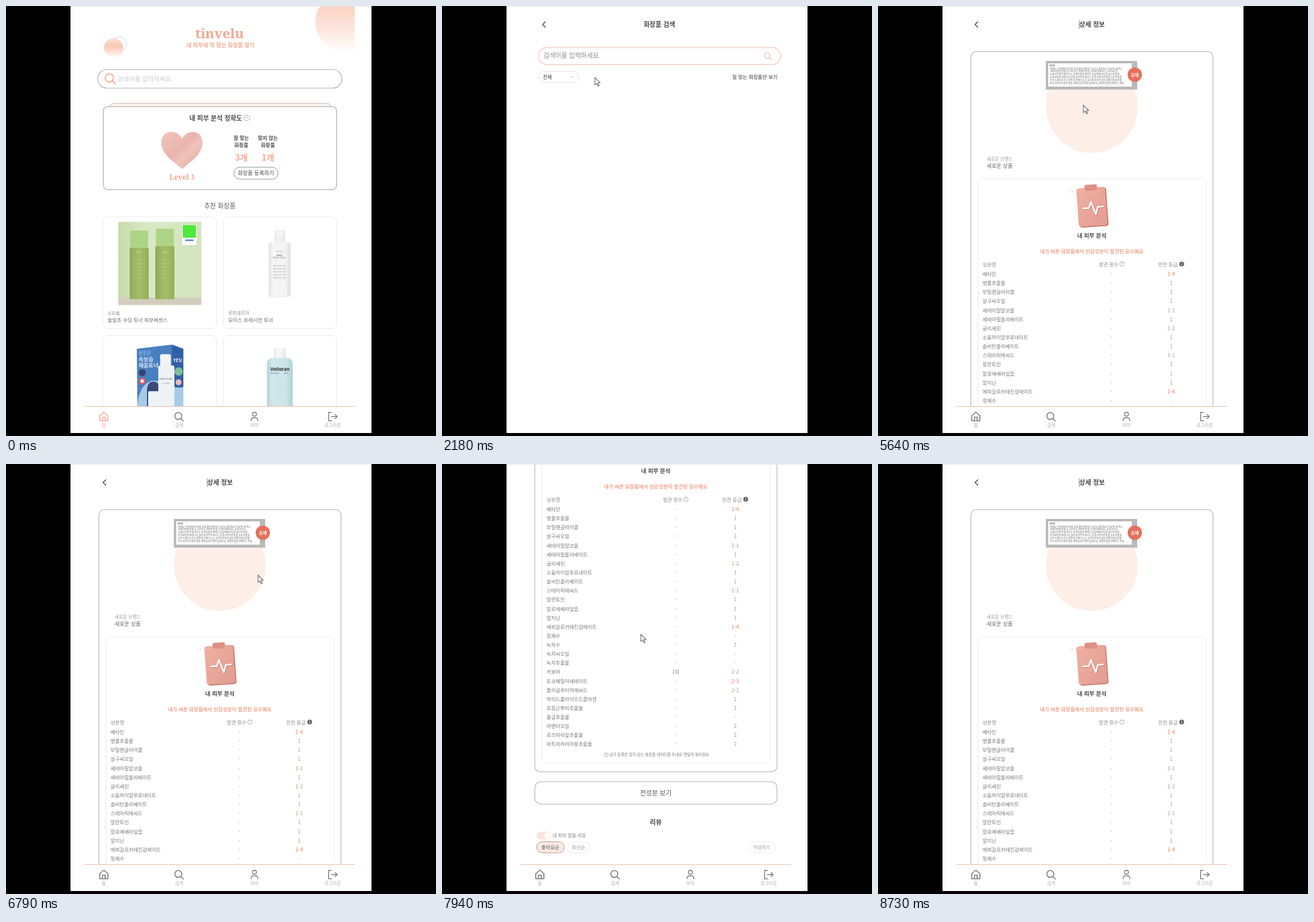
These frames come from a looping animation (720x720 px, 9.06 s). An HTML page:

```html
<!DOCTYPE html>
<html lang="ko">
<head>
<meta charset="utf-8">
<title>화장품 검색</title>
<style>
  html, body { margin: 0; width: 100%; height: 100%; overflow: hidden; background: #000; }
  svg { display: block; width: 720px; height: 720px; font-family: "Noto Sans CJK KR", "Noto Sans CJK JP", "Noto Sans CJK", sans-serif; }
  .serif { font-family: "Noto Serif", serif; font-weight: 900; }
</style>
</head>
<body>
<svg id="stage" viewBox="0 0 720 720" xmlns="http://www.w3.org/2000/svg"></svg>
<script>
const LOOP = 9060;
const SALMON = '#f3a891', DARK = '#4a4a4a', GRAY = '#777', LIGHT = '#ebebeb';

// Text is placed by its vertical centre.
const text = (x, cy, str, size, fill = DARK, attrs = '') =>
  `<text x="${x}" y="${(cy + size * 0.37).toFixed(2)}" font-size="${size}" fill="${fill}" ${attrs}>${str}</text>`;
const MID = 'text-anchor="middle"';
const BOLD = 'font-weight="700"';
const MEDIUM = 'font-weight="500"';
const MIDBOLD = MID + ' ' + BOLD;
const rect = (x, y, w, h, r, fill, stroke = 'none', sw = 1) =>
  `<rect x="${x}" y="${y}" width="${w}" height="${h}" rx="${r}" fill="${fill}" stroke="${stroke}" stroke-width="${sw}"/>`;
const circle = (x, y, r, fill, stroke = 'none', sw = 1) =>
  `<circle cx="${x}" cy="${y}" r="${r}" fill="${fill}" stroke="${stroke}" stroke-width="${sw}"/>`;
const line = (d, stroke, sw = 1, attrs = '') =>
  `<path d="${d}" fill="none" stroke="${stroke}" stroke-width="${sw}" stroke-linecap="round" stroke-linejoin="round" ${attrs}/>`;
const lens = (x, y, r, stroke, sw) =>
  circle(x, y, r, 'none', stroke, sw) + line(`M${x + r * .72} ${y + r * .72}l${r * .75} ${r * .75}`, stroke, sw);
const back = x => line(`M${x + 2} 26.5l-4.5 4.5 4.5 4.5`, '#555', 1.7);
const help = (x, y, r) => circle(x, y, r, 'none', '#999', .8) + text(x, y, '?', r * 1.5, '#999', MID);
const gradient = (id, stops, dir = 'x1="0" y1="0" x2="0" y2="1"') =>
  `<linearGradient id="${id}" ${dir}>` + stops.map(([at, color]) => `<stop offset="${at}" stop-color="${color}"/>`).join('') + '</linearGradient>';
const ACROSS = 'x1="0" y1="0" x2="1" y2="0"';

const defs = `<defs>
  ${gradient('sun', [[0, '#fbd0bf'], [.25, '#fbd3c4'], [.6, '#fde5dc'], [1, '#fffefd']])}
  ${gradient('ball', [[0, '#fce0d5'], [.4, '#f9c8b5'], [.65, '#fbd9cc'], [1, '#fffdfc']])}
  ${gradient('heart', [[0, '#f1c6be'], [.45, '#e9b4ac'], [.6, '#efc2ba'], [1, '#e3aaa2']], 'x1="0" y1="0" x2="1" y2="1"')}
  ${gradient('leaf', [[0, '#c8dcac'], [.35, '#d9e8c5'], [1, '#d3e4bd']], ACROSS)}
  ${gradient('green', [[0, '#90ab55'], [.5, '#a6be6b'], [1, '#94af58']], ACROSS)}
  ${gradient('white', [[0, '#e2e2e2'], [.2, '#f6f6f6'], [.8, '#f3f3f3'], [1, '#dcdcdc']], ACROSS)}
  ${gradient('aqua', [[0, '#b3d3d7'], [.2, '#d2e8ea'], [.75, '#cae4e7'], [1, '#b0d1d6']], ACROSS)}
  ${gradient('board', [[0, '#efb0a3'], [1, '#e39c90']], 'x1="0" y1="0" x2="1" y2="1"')}
  <clipPath id="page"><rect x="108" y="0" width="504" height="715"/></clipPath>
  <clipPath id="body"><rect x="108" y="0" width="476" height="670"/></clipPath>
</defs>`;

function greenBottles() {
  const bottle = (x, y) => rect(x + 1, y, 30, 32, 2, '#aed486') + rect(x, y + 29, 32, 491 - y - 29, 2, 'url(#green)')
    + text(x + 16, 413, 'toner', 4, '#d3e0b0', MID)
    + [0, 1, 2, 3, 4, 5].map(i => text(x + 16, 425 + i * 6, 'calm water mild', 2.6, '#bccf90', MID)).join('');
  return rect(188, 361.5, 139, 139, 0, 'url(#leaf)') + rect(188, 488, 139, 12.5, 0, '#d3cdbd')
    + bottle(207, 376) + bottle(250, 373)
    + rect(295, 367, 24, 33, 0, '#fff') + rect(296, 367, 22, 21, 0, '#4fe83c')
    + rect(300, 391, 14, 2.5, 0, '#5b86c6');
}

function whiteBottle() {
  return rect(450, 375.5, 17, 22, 3, 'url(#white)') + line('M451 389h15', '#d2d2d2', .7)
    + rect(440, 396, 36, 91, 5, 'url(#white)', '#e2e2e2', .6)
    + text(458, 411, 'soft care', 3, '#999', MID) + text(458, 418, 'MILD', 4, '#777', MIDBOLD)
    + text(458, 422, 'water toner', 4, '#888', MID)
    + [0, 1, 2, 3, 4].map(i => text(458, 435 + i * 5, 'daily moist skin', 3, '#999', MID)).join('');
}

function blueBox() {
  return `<path d="M219 574l59-7v105h-58z" fill="#4a80c1"/><path d="M278 567l19 7v98h-19z" fill="#335fa6"/>`
    + `<path d="M220 672c2-36 18-48 36-44 14 3 22 14 41 10v34z" fill="#a5cbe8"/>`
    + text(222, 581, '산뜻한', 7.5, '#8fbbe4', BOLD) + text(222, 591.5, '속보습', 9, '#dcebf7', BOLD)
    + text(222, 602, '채움토너', 9, '#dcebf7', BOLD)
    + circle(228, 614, 6, '#33456f') + circle(228, 628, 6, '#cf5f70') + circle(228, 628, 3, '#f3dfe2')
    + circle(289, 612, 7, '#7cbd9c') + text(288, 593, 'YES!', 7, '#fff', MIDBOLD) + circle(289, 630, 5, '#e8b8b2')
    + `<path d="M236 671v-26q0-16 11-16t10 16v26z" fill="#3a4a78"/>` + rect(238, 645, 18, 27, 2, '#edf3f7')
    + rect(258, 583, 18, 22, 3, '#f4f5f6') + rect(255, 602, 27, 70, 3, '#eef2f5')
    + line('M259 590v13M276 590v13', '#d2d7dc', .7)
    + text(268, 625, 'moist toner', 4, '#667', MID) + text(268, 632, 'for daily', 3, '#889', MID);
}

function aquaBottle() {
  return rect(449, 572.5, 19, 19, 3, 'url(#white)')
    + `<path d="M437 674v-74q0-11 12-11h19q12 0 12 11v74z" fill="url(#aqua)"/>`
    + text(458.5, 608, 'Velloran', 8, '#333', 'text-anchor="middle" font-weight="700" font-family="Inter, sans-serif"')
    + text(443, 615, 'skin toner', 3, '#557') + text(465, 615, 'mild', 3, '#557');
}

function homePage() {
  const card = (x, y) => rect(x, y, 190, 187, 8, '#fff', LIGHT);
  const count = (x, label, n) => text(x, 221, label, 8.5, DARK, MIDBOLD) + text(x, 233, '화장품', 8.5, DARK, MIDBOLD)
    + text(x, 253.5, n, 14, SALMON, MIDBOLD);
  return circle(568, 27, 50, 'url(#sun)')
    + circle(190, 64, 12, 'none', '#c4c4c4', .8) + circle(180, 70, 16, 'url(#ball)')
    + text(357.5, 46, 'tinvelu', 22.5, SALMON, MID + ' class="serif"')
    + text(302, 66, '내 피부에 딱 맞는 화장품 찾기', 9.2, SALMON, BOLD)
    + rect(153.5, 106.5, 409, 31, 15.5, '#fff', '#b0b0b0', 1.2) + lens(173, 120.5, 6.8, SALMON, 1.8)
    + text(187, 122, '검색어를 입력하세요.', 10.4, '#c9c9c9')
    + rect(173, 163, 372, 20, 8, '#fbf3ee', '#cbb5aa') + rect(163, 168.5, 390.5, 139, 7, '#fff', '#a4a4a4', 1.1)
    + text(307, 187.5, '내 피부 분석 정확도', 10.8, DARK, BOLD) + help(403, 187.5, 4.8)
    + `<path d="M295 273C286 264 260 250 260 229C260 207 286 205 295 222C304 205 329 207 329 229C329 250 304 264 295 273z" fill="url(#heart)"/>`
    + text(295, 287, 'Level 1', 12, SALMON, MID + ' class="serif"')
    + count(394, '잘 맞는', '3개') + count(438.5, '맞지 않는', '1개')
    + rect(381.5, 270, 74, 20, 10, '#fff', '#909090') + text(418.5, 280, '화장품 등록하기', 9, DARK, MID + ' ' + MEDIUM)
    + text(358, 335, '추천 화장품', 10.8, '#5c5c5c', MID)
    + card(162.5, 353) + card(363.5, 353) + card(162.5, 551.5) + card(363.5, 551.5)
    + greenBottles() + whiteBottle() + blueBox() + aquaBottle()
    + text(170, 514, '오르벨', 7.4, '#888') + text(170, 526, '솔잎초 수딩 토너 피부에센스', 8.45, '#666')
    + text(372, 514, '루미네르아', 7.6, '#888') + text(372, 526, '모이스 프레시안 토너', 8.5, '#666');
}

function searchPage() {
  return back(171) + text(364, 31, '화장품 검색', 10.8, DARK, MIDBOLD)
    + `<rect id="field" x="161.5" y="69.5" width="405.5" height="28.5" rx="14.2" fill="#fff" stroke-width="2"/>`
    + lens(544.5, 83, 4.8, '#f5c8bb', 1.6)
    + `<g id="hint">${text(170, 83, '검색어를 입력하세요.', 10.8, '#8c8c8c')}</g>`
    + `<text id="typed" x="170" y="88.3" font-size="10.6" fill="#444"></text>`
    + `<path id="under" stroke="#444" fill="none"/><path id="caret" stroke="#555" fill="none"/>`
    + rect(161.5, 109.5, 67, 19, 9.5, '#fff', '#e3e3e3') + text(169, 119, '전체', 8.2, '#333', MEDIUM)
    + line('M216 118l2.3 2.2 2.3-2.2', '#aaa', .8)
    + text(486, 118.5, '잘 맞는 화장품만 보기', 8.3, '#333', MEDIUM)
    + `<g id="result">${text(169, 144, '새로운 브랜드 새로운 상품', 10.65, '#777')}${line('M161 157.5H567', '#ddd')}</g>`;
}

const ingredients = `베타인 1-4,병풀추출물 1,부틸렌글라이콜 1,살구씨오일 1,세테아릴알코올 1-1,세테아릴올리베이트 1,글리세린 1-2,소듐하이알루로네이트 1,솔비탄올리베이트 1,스테아릭애씨드 1-1,알란토인 1,알로에베라잎즙 1,알지닌 1,에피갈로카테킨갈레이트 1-4,정제수 -,녹차수 1,녹차씨오일 -,녹차추출물 -,카보머 1-2,토코페릴아세테이트 2-3,폴리글루타믹애씨드 2-1,하이드롤라이즈드콜라겐 1,호장근뿌리추출물 1,황금추출물 -,라벤더오일 2,로즈마리잎추출물 2,마트리카리아꽃추출물 2`
  .split(',').map(row => row.split(' '));

function detailPage() {
  const small = ['정제수,부틸렌글라이콜,글리세린,베타인,녹차수,알란토인,카보머,알지닌',
    '세테아릴알코올,살구씨오일,병풀추출물,스테아릭애씨드,녹차씨오일',
    '소듐하이알루로네이트,솔비탄올리베이트,알로에베라잎즙,황금추출물',
    '토코페릴아세테이트,폴리글루타믹애씨드,호장근뿌리추출물,녹차추출물',
    '하이드롤라이즈드콜라겐,라벤더오일,로즈마리잎추출물,세테아릴알코올',
    '마트리카리아꽃추출물,에피갈로카테킨갈레이트,세테아릴올리베이트,향료'];
  const rows = ingredients.map(([name, grade], i) => {
    const y = 449 + i * 15.13;
    const color = /-[34]$/.test(grade) ? '#f2a491' : '#bcc0ac';
    return text(175, y, name, 8.3, GRAY, MEDIUM) + text(391, y, name === '카보머' ? '1회' : '-', 8.3, '#888', MID)
      + text(491, y, grade, 8.3, color, MIDBOLD);
  }).join('');
  return back(165) + text(337, 31, '상세 정보', 10.8, DARK, BOLD) + line('M337 24.5V38', '#555', .8)
    + rect(155.5, 76.5, 405.5, 812, 9, '#fff', '#b0b0b0', 1.1)
    + circle(358, 169, 77, '#fdeee8') + rect(281, 92, 153, 48, 0, '#b9b9b9') + rect(285, 96, 140, 39, 0, '#fff')
    + text(287, 100, '전성분', 3.4, '#555', BOLD)
    + small.map((s, i) => text(288, 105 + i * 4.8, s, 4.1, '#666')).join('')
    + circle(430, 115, 12, '#e6715c') + text(430, 115.5, '유해', 7.2, '#fff', MIDBOLD)
    + text(182, 256, '새로운 브랜드', 7.5, '#999') + text(182, 268, '새로운 상품', 8.9, '#666', MEDIUM)
    + rect(167.5, 289, 382, 585, 8, '#fff', LIGHT)
    + `<g transform="rotate(-4 358 336)">${rect(336, 305, 48, 65, 4, '#cd8379')}${rect(334, 304, 48, 64, 4, 'url(#board)')}${rect(348, 299, 21, 10, 3, '#dc9186')}`
    + line('M343 338h10l4-10 7 21 4-12h9', '#c98479', 3, 'transform="translate(1 1)"') + line('M343 338h10l4-10 7 21 4-12h9', '#fff', 2.6) + '</g>'
    + circle(325, 311, 1, '#d9a69c')
    + text(358, 384, '내 피부 분석', 9.5, DARK, MIDBOLD)
    + text(271, 411, '내가 써본 화장품에서 민감성분이 발견된 횟수예요', 8.4, '#f2a28d', BOLD)
    + text(175, 432.5, '성분명', 8.3, '#8a8a8a') + text(370, 432.5, '발견 횟수', 8.2, '#8a8a8a') + help(408.5, 432, 3.7)
    + text(469, 432.5, '안전 등급', 8.3, '#8a8a8a') + circle(508.5, 432, 4, '#666') + line('M508.5 431.5v2.2M508.5 429.8v.1', '#fff', .9)
    + rows + help(275, 860, 3.2) + text(280, 860, '내가 등록한 맞지 않는 화장품 데이터를 토대로 면밀히 찾아줘요', 6.4, '#777', MEDIUM)
    + rect(155.5, 905, 405.5, 37.5, 10, '#fff', '#b0b0b0', 1.1) + text(358, 924, '전성분 보기', 10.8, '#555', MID)
    + text(358, 973, '리뷰', 10.8, DARK, MIDBOLD)
    + rect(158.5, 988.5, 25, 13, 6.5, '#fae5de') + circle(177, 995, 5.5, '#fff')
    + text(185, 995, '내 피부 맞춤 리뷰', 7.7, '#777')
    + rect(158.5, 1005.5, 46.5, 18.5, 9.2, '#fbe9e3', '#a99b97') + text(181.5, 1015, '좋아요순', 8.3, '#555', MID + ' ' + MEDIUM)
    + rect(210.5, 1005.5, 37.5, 18.5, 9.2, '#fff', LIGHT) + text(228.5, 1015, '최신순', 8.3, '#999', MID)
    + rect(513.5, 1005.5, 44.5, 18.5, 9.2, '#fff', LIGHT) + text(535, 1015, '작성하기', 7.6, '#999', MID);
}

function navBar() {
  const label = (x, s) => text(x, 702.5, s, 7.5, '#aaa', MID);
  return rect(108, 670, 504, 45, 0, '#fff') + line('M132 670.5H584', '#f0bba6', 1.1)
    + `<g id="homeIcon" fill="none" stroke-width="1.6" stroke-linejoin="round"><path d="M157 686l6.8-6 6.8 6v8.5h-13.6z"/><path d="M161.5 694v-5.5h4.6v5.5"/></g>`
    + `<text id="homeLabel" x="163.8" y="705.3" font-size="7.5" text-anchor="middle">홈</text>`
    + lens(288.5, 686.5, 5.8, '#777', 1.5) + label(290, '검색')
    + circle(416, 683.5, 3.3, 'none', '#777', 1.4) + line('M410.5 694.5v-1q0-4 4-4h3q4 0 4 4v1', '#777', 1.4) + label(416, '마이')
    + line('M545 680.5h-4.8v14h4.8M545 687.5h9M551 684l3.5 3.5-3.5 3.5', '#777', 1.4) + label(547, '로그아웃');
}

document.getElementById('stage').innerHTML = defs + `<g clip-path="url(#page)">
  ${rect(108, 0, 504, 715, 0, '#fff')}
  <g id="home" clip-path="url(#body)">${homePage()}</g>
  <g id="search">${searchPage()}</g>
  <g id="detail" clip-path="url(#body)"><g id="scroller">${detailPage()}</g></g>
  <g id="nav">${navBar()}</g>
  ${rect(108, 0, 504, 1, 0, '#e6e6e6')}
  <path id="arrow" d="M0 0v12.2l3-2.6 2.1 4.6 2-1-2.1-4.4h4z" fill="#fff" stroke="#666" stroke-width="1.1" stroke-linejoin="round"/>
  <path id="beam" d="M-2.5-6Q0-6 0-5Q0-6 2.5-6M0-5V5M-2.5 6Q0 6 0 5Q0 6 2.5 6" fill="none" stroke="#666" stroke-width="1.1"/>
</g>`;

const el = {};
document.querySelectorAll('#stage [id]').forEach(node => el[node.id] = node);
const show = (node, on) => node.setAttribute('visibility', on ? 'visible' : 'hidden');
const ease = p => p * p * (3 - 2 * p);

// Each key is [time, ...values]; values ease between neighbouring keys.
function sample(keys, t) {
  const next = keys.findIndex(key => key[0] > t);
  if (next === 0) return keys[0].slice(1);
  if (next < 0) return keys[keys.length - 1].slice(1);
  const from = keys[next - 1], to = keys[next];
  const p = ease((t - from[0]) / (to[0] - from[0]));
  return from.slice(1).map((v, i) => v + (to[i + 1] - v) * p);
}

const pointer = [[850, 520, 330], [1500, 256, 120], [4570, 256, 120], [4571, 287, 150], [4880, 287, 150],
  [5000, 296, 166], [5150, 272, 148], [5330, 272, 148], [5970, 422, 186], [6850, 422, 186], [7030, 322, 93],
  [7360, 322, 93], [7520, 333, 285], [8520, 333, 285], [8700, 614, 300]];
const scroll = [[6880, 0], [7270, 227], [7700, 227], [7930, 373], [8500, 373], [8720, 0]];
const typing = [[2970, 'ㅅ'], [3150, '새'], [3330, '샐'], [3480, '새로'], [4030, '새롱'], [4120, '새로우'], [4240, '새로운']];

function render(t) {
  const page = t < 1760 ? 'home' : t < 5300 ? 'search' : 'detail';
  for (const name of ['home', 'search', 'detail']) el[name].setAttribute('display', name === page ? 'inline' : 'none');
  show(el.nav, page !== 'search');
  el.homeIcon.setAttribute('stroke', page === 'home' ? SALMON : '#777');
  el.homeLabel.setAttribute('fill', page === 'home' ? SALMON : '#aaa');

  const typed = typing.reduce((word, [at, value]) => t >= at ? value : word, '');
  const end = 170 + typed.length * 9.75;
  el.typed.textContent = typed;
  show(el.hint, !typed);
  show(el.under, typed);
  el.under.setAttribute('d', `M${end - 9} 90.5H${end}`);
  show(el.caret, (t >= 2790 && t < 2970) || (t >= 4240 && t < 4420));
  el.caret.setAttribute('d', `M${end + .5} 78V90`);
  el.field.setAttribute('stroke', t < 2520 ? '#f7d8cf' : '#f5cdbf');
  show(el.result, t >= 3670);

  el.scroller.setAttribute('transform', `translate(0 ${-sample(scroll, t)[0]})`);

  const place = `translate(${sample(pointer, t).join(' ')})`;
  const beam = t >= 4571 && t < 5300;
  el.arrow.setAttribute('transform', place);
  el.beam.setAttribute('transform', place);
  show(el.beam, beam);
  show(el.arrow, !beam && t >= 850 && t < 8720 && !(t >= 2520 && t < 4571));
}

const start = performance.now();
function tick(now) {
  render(Math.max(0, now - start) % LOOP);
  requestAnimationFrame(tick);
}
render(0);
requestAnimationFrame(tick);
</script>
</body>
</html>
```
